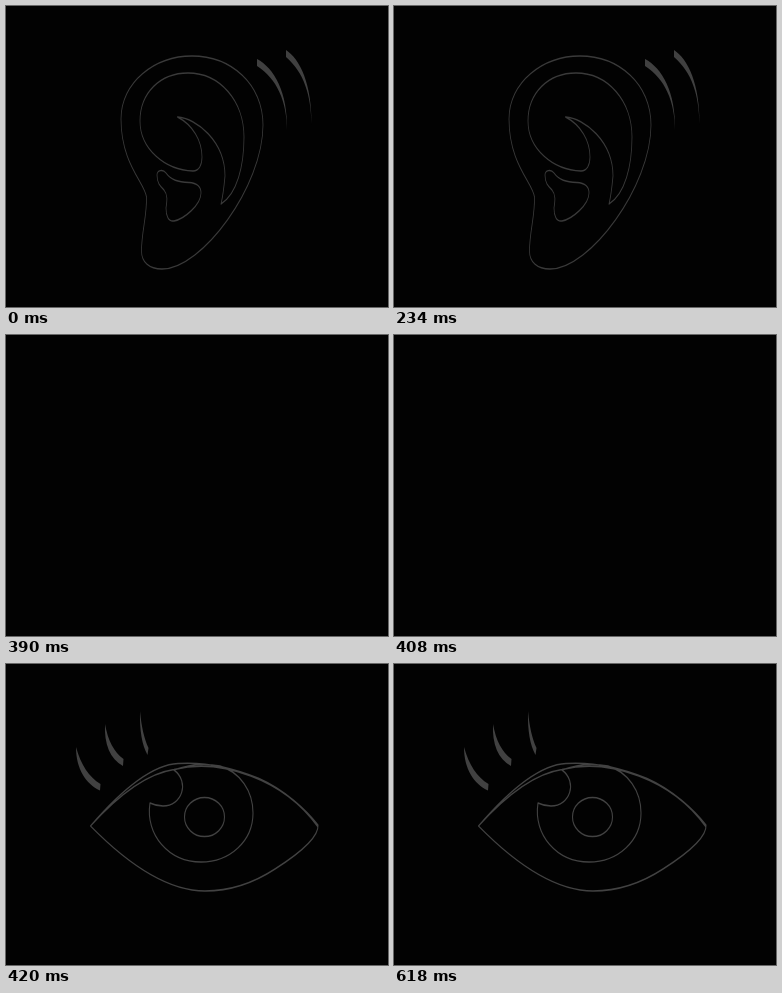
An HTML page with a canvas for the animation above (0.75 s loop, 382 px wide and 301 px high).

```html
<!DOCTYPE html>
<html lang="en">
<head>
<meta charset="utf-8">
<title>Hear, see</title>
<style>
html, body { margin: 0; width: 100%; height: 100%; overflow: hidden; background: #020202; }
canvas { display: block; }
</style>
</head>
<body>
<canvas id="stage" width="382" height="301"></canvas>
<script>
const ctx = document.getElementById('stage').getContext('2d');
const LOOP = 750, EAR_END = 390, EYE_START = 420;

// Oval nibs: flat runs come out heavier than upright ones.
const EAR_PEN = { w: 0.8, h: 1.5, color: '#3a3a3a' };
const EYE_PEN = { w: 1.1, h: 1.5, color: '#424242' };

// Outlines are pre-divided by the nib size, so that scaling the context shapes only the nib.
function outline(pen, ...paths) {
  const inverse = new DOMMatrix().scale(1 / pen.w, 1 / pen.h);
  const path = new Path2D();
  paths.forEach(d => path.addPath(new Path2D(d), inverse));
  return path;
}

const ear = outline(EAR_PEN,
  // rim and lobe
  'M186 50C225 50 257 78 257 119C257 180 196 263 156 263C143 263 135.500 256 135.500 245C135.500 226 141 210 140.500 191C139 177 115 158 115 113C115 76 149 50 186 50Z',
  // inner fold
  'M171.500 111C190 112 219 135 219 170C218 181 217 190 215 198C231 188 238 160 238 131C238 95 214 67 182 67C154 67 134 87 134 115C134 143 159 164 187 165C193 165 196 159 196 151C196 135 187 119 171.500 111Z',
  // canal
  'M151 169C151 164 157 163 160 167C165 174 172 176 183 176.500C191 177 195 180 195 187C195 199 178 213 168 215C162 216 160 209 160 202C161 195 162 189 158 184C154 180 151 177 151 169Z'
);

const waves = new Path2D(
  'M251 53C268 62 282 86 281 125C281 95 271 73 251 60Z' +
  'M280 44C294 53 306 78 305.500 119C305 88 298 67 280 51Z'
);

const eye = outline(EYE_PEN,
  // lids
  'M84.500 162C106 137 141 101 172 99.500C203 97.500 230 105 253 114.500C279 126 300 146 312 161C313 174 291 191 269 205C243 222 219 227 199 227C155 227 113 191 84.500 162Z',
  'M84.500 162C108 136 138 110 168 105.500C215 94 278 115 312 163',
  // iris with highlight cut out
  'M168 106C184 118 176 142 157 142C152 142 148 141 144 139C139 171 163 198 195 198C224 198 247 177 247 149C247 127 234 108 214 102C198 99 181 101 168 106Z',
  // pupil
  'M218.500 153A20 19.500 0 1 1 178.500 153A20 19.500 0 1 1 218.500 153Z'
);

const lashes = new Path2D(
  'M70 83C70 105 80 120 94 126.500L94.500 120C83 113 75 101 70 83Z' +
  'M99 60C98 80 104 95 117 102L117.500 95C108 88 102 77 99 60Z' +
  'M134 47C133.500 67 136 81 141.500 91L142.500 84C138 74 135.500 63 134 47Z'
);

function paint(pen, lines, marks, fill) {
  ctx.save();
  ctx.scale(pen.w, pen.h);
  ctx.strokeStyle = pen.color;
  ctx.stroke(lines);
  ctx.restore();
  ctx.fillStyle = fill;
  ctx.fill(marks);
}

function draw(now) {
  const t = now % LOOP;
  ctx.fillStyle = '#020202';
  ctx.fillRect(0, 0, 382, 301);
  if (t < EAR_END) paint(EAR_PEN, ear, waves, '#404040');
  else if (t >= EYE_START) paint(EYE_PEN, eye, lashes, '#414141');
}

function tick() {
  draw(performance.now());
  requestAnimationFrame(tick);
}
ctx.lineWidth = 1;
ctx.lineJoin = 'round';
tick();
</script>
</body>
</html>
```
